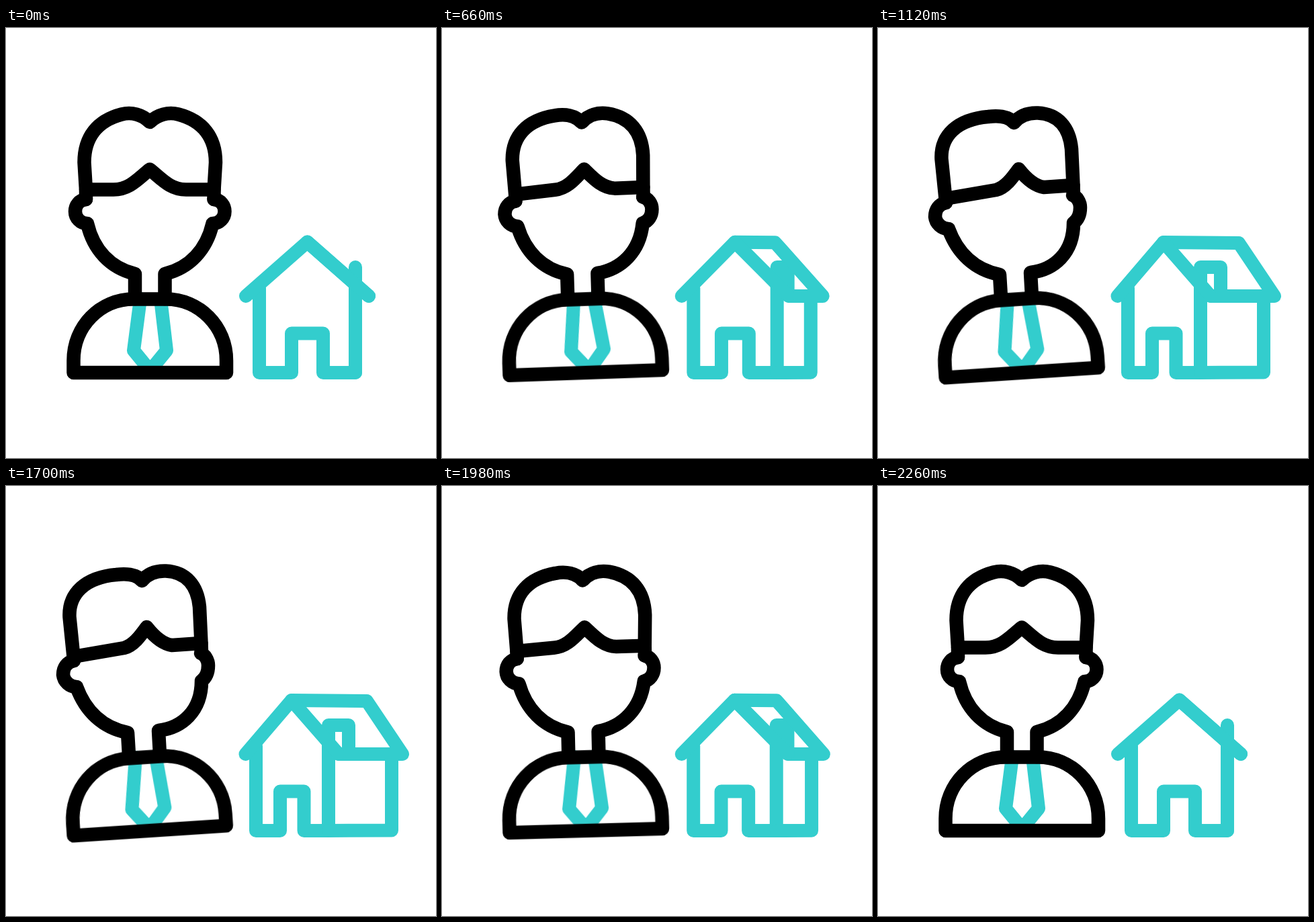
Write an HTML page that moves like this. It is 640 px wide and 640 px high and loops after 2400 ms.

```html
<!DOCTYPE html>
<html lang="en">
<head>
<meta charset="utf-8">
<title>Agent and house</title>
<style>
  html, body { margin: 0; width: 100%; height: 100%; overflow: hidden; background: #fff; }
  svg { display: block; width: 100%; height: 100%; }
  path { fill: none; stroke-linecap: round; stroke-linejoin: round; }
  .ink path { stroke: #000; stroke-width: 20.5px; }
  .teal, .teal path { stroke: #33cdcd; stroke-width: 20px; }

  /* --a is the pose at rest, --b the turned pose */
  .head path, .house path, .torso, .tie {
    animation: 2400ms cubic-bezier(.333, 0, .667, 1) infinite;
  }
  .head path { animation-name: turn-head; }
  .house path { animation-name: turn-house; }
  .torso { animation-name: lean; transform-origin: 214px 513px; }
  .tie { animation-name: swing; transform-origin: 214px 403px; }

  @keyframes turn-head {
    0%, 16.667%, 91.667%, 100% { d: var(--a); }
    37.5%, 70.833% { d: var(--b); }
  }
  @keyframes turn-house {
    0%, 16.667%, 93.75%, 100% { d: var(--a); }
    37.5%, 72.917% { d: var(--b); }
  }
  @keyframes lean {
    0%, 16.667%, 91.667%, 100% { transform: rotate(0deg); }
    37.5%, 70.833% { transform: rotate(-3.75deg); }
  }
  @keyframes swing {
    0%, 16.667%, 94.167%, 100% { transform: rotate(0deg); }
    27.083% { transform: rotate(-2.4deg); }
    37.5% { transform: rotate(1.2deg); }
    47.917% { transform: rotate(-.5deg); }
    58.333% { transform: rotate(.6deg); }
    70.833% { transform: rotate(.3deg); }
    82% { transform: rotate(0deg); }
  }

  .hair {
    --a: path("M119 255 L119 241 L116.5 200 C116.5 162 136 138 172 128.500 C187 124.500 203 129 214 140 C225.500 129 241.500 124.500 256.500 128.500 C292.500 138 312 162 312 200 L309.500 241 L309.500 255");
    --b: path("M101 260 L100.5 254 L94.5 195 C93 160 118 136 164 132 C180 130 194 131 202.500 141 C212 129 225 126 238 126.500 C268 128 285 148 288 180 L290.500 234 L291 248");
  }
  .fringe {
    --a: path("M119 240.5 L160 240.5 C184 240.5 197 224 214 210.5 C231 224 244 240.5 268 240.5 L309.5 240.5");
    --b: path("M100.5 254 L176 241 C190 237 200 223 209.5 210 C219 222 232 235 247 237 L290.5 234");
  }
  .left {
    --a: path("M119 255 C109 256 103 264 103 273 C103 283 111 291 121 291 C130 330 155 357 192 366 L192 403");
    --b: path("M101 260 C91 262 85 270 85 281 C86 291 95 299 105 299 C118 335 144 360 181 367 L183 400");
  }
  .right {
    --a: path("M309.5 255 C319.5 256 325.5 264 325.5 273 C325.5 283 317.5 291 307.5 291 C298.5 330 273.5 357 236.5 366 L236.5 403");
    --b: path("M290 249 C296 251 301 259 301 267 C301 277 298 285 291 290 C291 335 262 360 227 364 L229 400");
  }

  .front {
    --a: path("M377 387 L377 513 L425 513 L425 454.5 L472 454.5 L472 513 L520 513 L520 356 L520 356 L520 390");
    --b: path("M372 387 L372 513 L408 513 L408 454.5 L443.5 454.5 L443.5 513 L480 513 L480 356 L510 356 L510 390");
  }
  .side {
    --a: path("M520 513 L520 513 L520 399");
    --b: path("M480 513 L574 512.5 L574 399");
  }
  .gable {
    --a: path("M357 399 L448.5 318.5 L540 399");
    --b: path("M356.5 399 L425 319 L495 399");
  }
  .roof {
    --a: path("M448.5 318.5 L448.5 318.5 L540 399 L540 399");
    --b: path("M425 319 L537 320 L590 399 L495 399");
  }
</style>
</head>
<body>
<svg viewBox="0 0 640 640">
  <g class="house teal">
    <path class="front"/>
    <path class="side"/>
    <path class="roof"/>
    <path class="gable"/>
  </g>
  <g class="torso ink">
    <g class="tie teal">
      <path style="stroke:#33cdcd;stroke-width:20px" d="M200 403L190 480L214.5 510L239 480L230 403"/>
    </g>
    <path d="M100.5 513V495C100.5 444 140 403.500 190 403.500H238C288 403.500 328 444 328 495V513Z"/>
  </g>
  <g class="head ink">
    <path class="left"/>
    <path class="right"/>
    <path class="hair"/>
    <path class="fringe"/>
  </g>
</svg>
</body>
</html>
```
